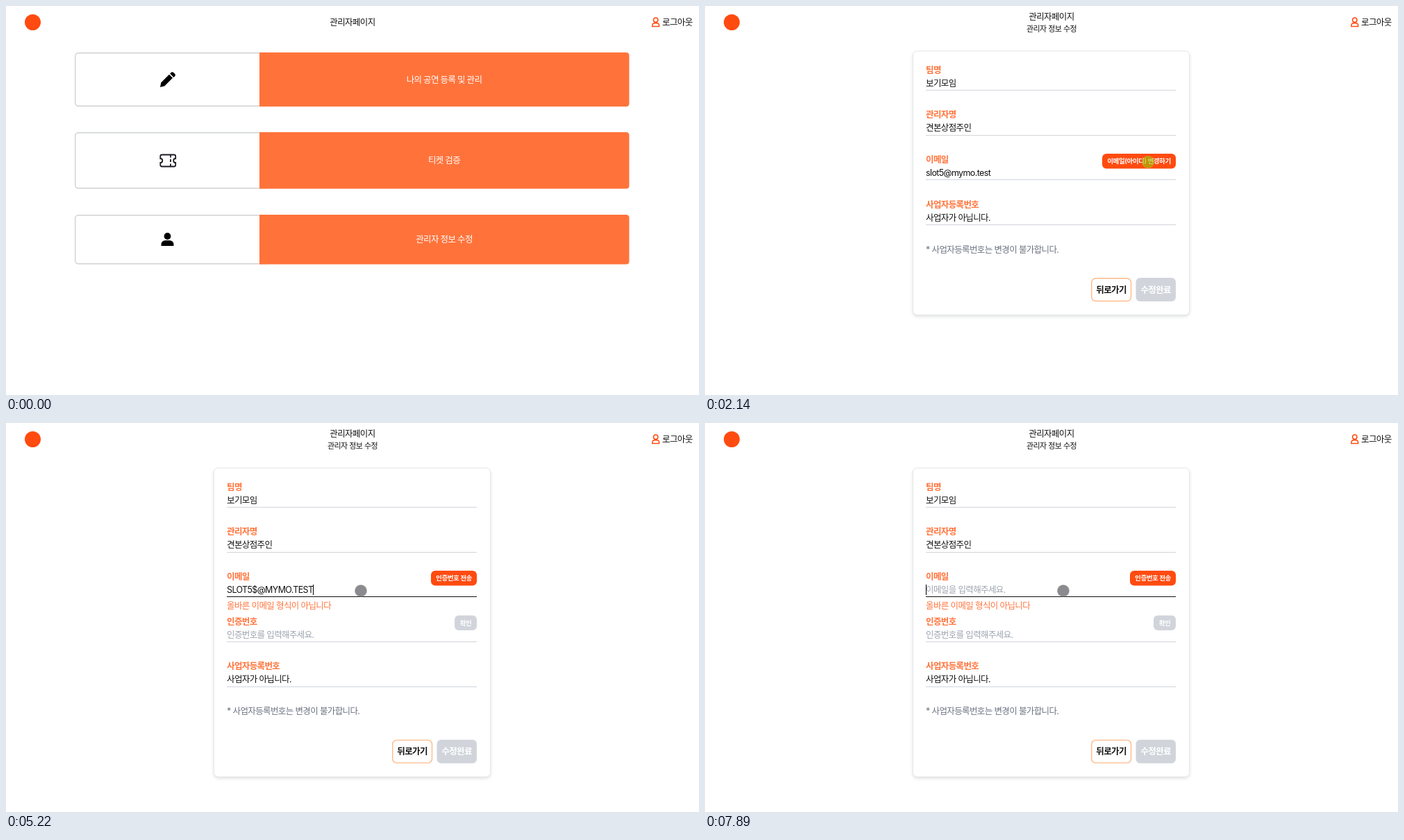
Recreate the animation shown at these times as an HTML page. Size 998x561 px, loop 8 s.

```html
<!DOCTYPE html>
<html lang="ko">
<head>
<meta charset="utf-8">
<style>
  html, body { margin: 0; width: 100%; height: 100%; overflow: hidden; background: #fff; }
  svg { display: block; width: 998px; height: 561px; }
  text { font-family: Inter, "Noto Sans CJK KR", "Noto Sans CJK", sans-serif; letter-spacing: -.05em; white-space: pre; }
  .card { filter: drop-shadow(0 2px 2px rgba(0, 0, 0, .12)); }
</style>
</head>
<body>
<svg id="stage" viewBox="0 0 998 561"></svg>
<script>
const LOOP = 8000, TICK = 66.9;   // the screen refreshes about 15 times a second
const PALE = '#ff733b', VIVID = '#ff4b10', GREY = '#d1d5db', HINT = '#9ca3af', INK = '#111';
const ROW = 64.65, LEFT = 318, RIGHT = 678;
const EMAIL = 'slot5@mymo.test', WRONG = 'SLOT5$@MYMO.TEST';

// pointer path: [tick, x, y]
const path = [
  [2, 976, 556], [3, 928, 477], [4, 903, 425], [5, 880, 400], [7, 822, 347],
  [23, 819, 345], [25, 795, 322], [27, 750, 292], [28, 720, 270], [31, 638, 225],
  [38, 638, 225], [43, 590, 240], [67, 590, 240], [70, 593, 277],
  [74, 593, 277], [78, 511, 242], [86, 511, 242], [89, 527, 279],
  [98, 527, 279], [102, 516, 242]
];
const clicks = [11, 32, 44, 74, 90, 104];

const stage = document.getElementById('stage');
const within = (n, from, to) => n >= from && n < to;

// y is the middle of the line of text
function text(x, y, str, { size = 12.5, fill = INK, weight = 400, anchor = 'start', id = '' } = {}) {
  return `<text id="${id}" x="${x}" y="${y + size * .375}" font-size="${size}" fill="${fill}"
    font-weight="${weight}" text-anchor="${anchor}">${str}</text>`;
}

const rect = (x, y, w, h, fill, r = 0, extra = '') =>
  `<rect x="${x}" y="${y}" width="${w}" height="${h}" rx="${r}" fill="${fill}" ${extra}/>`;

function button(x, y, w, h, label, { fill = VIVID, color = '#fff', size = 9.6, edge = 'none' } = {}) {
  return rect(x, y, w, h, fill, 6, `stroke="${edge}" stroke-width="1.4"`) +
    text(x + w / 2, y + h / 2, label, { size, fill: color, weight: 700, anchor: 'middle' });
}

function field(row, label, value, hint = '', { line = GREY, id = '', fill = INK } = {}) {
  const y = 92 + row * ROW;
  return text(LEFT, y, label, { fill: PALE, weight: 700 }) +
    text(LEFT, y + 19, value || hint, { fill: value ? fill : HINT, id }) +
    rect(LEFT, Math.round(y + 29), RIGHT - LEFT, 1, line);
}

function header(sub) {
  return `<circle cx="38.5" cy="23.5" r="11.5" fill="${VIVID}"/>` +
    text(499, sub ? 15 : 23, '관리자페이지', { anchor: 'middle' }) +
    (sub ? text(499, 33, sub, { size: 11, anchor: 'middle' }) : '') +
    `<g fill="none" stroke="${VIVID}" stroke-width="1.5"><circle cx="935.7" cy="20.3" r="3.2"/>
      <path d="M930.8 29.5v-1.2q0-3.6 3.6-3.6h2.6q3.6 0 3.6 3.6v1.2z"/></g>` +
    text(945, 23, '로그아웃');
}

function menu() {
  const item = (y, h, label) =>
    rect(99.7, y + .7, 280, h - 1.4, '#fff', 4.5, 'stroke="#d0d1d4" stroke-width="1.4"') +
    `<path d="M365 ${y}h528q4.500 0 4.500 4.500v${h - 9}q0 4.500-4.500 4.500h-528z" fill="${PALE}"/>` +
    text(631, y + h / 2, label, { fill: '#fff', weight: 500, anchor: 'middle' });
  return header() +
    item(67, 78, '나의 공연 등록 및 관리') + item(182, 81.5, '티켓 검증') + item(301, 71.500, '관리자 정보 수정') +
    `<path d="M222 117l1.300-6.500 11.700-11.700 5 5-11.700 11.700zM236.200 97.500l1.600-1.700q1.600-1.300 3.300 0l2.200 2.200q1.400 1.500 0 3.200l-1.800 1.700z"/>
    <g fill="none" stroke="#1b1b24" stroke-width="1.8">
      <path d="M224.500 214.500h17.500q2.200 0 2.200 2.200v3.300a3 3 0 0 0 0 6v3.300q0 2.200-2.200 2.200h-17.500q-2.200 0-2.200-2.200v-3.300a3 3 0 0 0 0-6v-3.300q0-2.200 2.200-2.200z"/>
      <path d="M237 215v3.500m0 2.500v4m0 2.500v3.500"/></g>
    <circle cx="232.500" cy="332" r="4.900"/>
    <path d="M223.500 346v-1.500q0-6.500 6.500-6.500h5q6.500 0 6.500 6.500v1.500z"/>`;
}

function typed(n) {
  if (n < 33) return EMAIL;
  if (n < 50 || n >= 118) return '';
  return WRONG.slice(0, n < 51 ? 1 : n < 55 ? 2 : n < 70 ? 3 : WRONG.length);
}

function form(n) {
  const loaded = n >= 13, editing = n >= 33, drop = editing ? ROW : 0;
  const focused = editing && !within(n, 91, 104);
  const selected = within(n, 111, 118);
  const caretOn = focused && !selected &&
    ![[42, 44], [63, 75], [86, 91]].some(([a, b]) => within(n, a, b));
  const glow = Math.min(1, Math.max(0, (n - 34) / 3));
  const sendFill = `rgb(255,${115 - 40 * glow},${59 - 43 * glow})`;

  return header('관리자 정보 수정') +
    rect(299.5, 65, 398, 380.5 + drop, '#fff', 6, 'class="card" stroke="#e5e7eb"') +
    field(0, '팀명', loaded && '보기모임', '10자 이내의 국문 또는 영문') +
    field(1, '관리자명', loaded && '견본상점주인', '10자 이내의 국문 또는 영문') +
    (selected ? rect(LEFT, 233, 0, 15, '#0078d7', 0, 'id="selection"') : '') +
    field(2, '이메일', loaded && typed(n), '이메일을 입력해주세요.',
      { line: focused ? INK : GREY, id: 'email', fill: selected ? '#fff' : INK }) +
    (caretOn ? rect(LEFT, 233, 1, 15, '#000', 0, 'id="caret"') : '') +
    (editing
      ? button(612, 213, 66, 21.5, '인증번호 전송', { fill: sendFill }) +
        (n >= 75 ? text(LEFT, 263.5, '올바른 이메일 형식이 아닙니다', { fill: PALE }) : '') +
        field(3, '인증번호', '', '인증번호를 입력해주세요.') +
        button(646, 277.5, 32, 21.5, '확인', { fill: GREY })
      : button(572, 213, 106, 21.5, '이메일(아이디) 변경하기')) +
    field(editing ? 4 : 3, '사업자등록번호', loaded && '사업자가 아닙니다.') +
    text(LEFT, 351 + drop, '* 사업자등록번호는 변경이 불가합니다.', { fill: '#6b7280' }) +
    button(556.7, 392.7 + drop, 56.8, 32.8, '뒤로가기', { fill: '#fff', color: INK, size: 12.5, edge: '#fdba8a' }) +
    button(620.5, 392 + drop, 57.5, 34, '수정완료', { fill: GREY, size: 12.5 });
}

function pointer(n) {
  if (n < path[0][0]) return '';
  let i = path.findIndex(p => p[0] > n);
  if (i < 0) i = path.length;
  const [t0, x0, y0] = path[i - 1], [t1, x1, y1] = path[i] || [t0 + 1, x0, y0];
  const k = (n - t0) / (t1 - t0), pressed = clicks.includes(n);
  return `<circle cx="${x0 + (x1 - x0) * k}" cy="${y0 + (y1 - y0) * k}" r="8.3"
    fill="${pressed ? 'rgba(160,185,0,.62)' : 'rgba(90,90,95,.7)'}"
    stroke="${pressed ? 'rgba(190,190,30,.5)' : 'rgba(130,130,130,.45)'}" stroke-width="1.6"/>`;
}

let shown = -1;
function draw(now) {
  const n = Math.floor((now % LOOP + 10) / TICK);
  if (n !== shown) {
    shown = n;
    stage.innerHTML = (n < 12 ? menu() : form(n)) + pointer(n);
    const caret = document.getElementById('caret'), selection = document.getElementById('selection');
    const width = typed(n) && n >= 12 ? document.getElementById('email').getComputedTextLength() : 0;
    if (caret) caret.setAttribute('x', Math.round(LEFT + width));
    if (selection) selection.setAttribute('width', width);
  }
  requestAnimationFrame(draw);
}
const start = performance.now();
const loop = () => draw(Math.max(0, performance.now() - start));
draw = (base => () => base(Math.max(0, performance.now() - start)))(draw);
loop();
</script>
</body>
</html>
```
